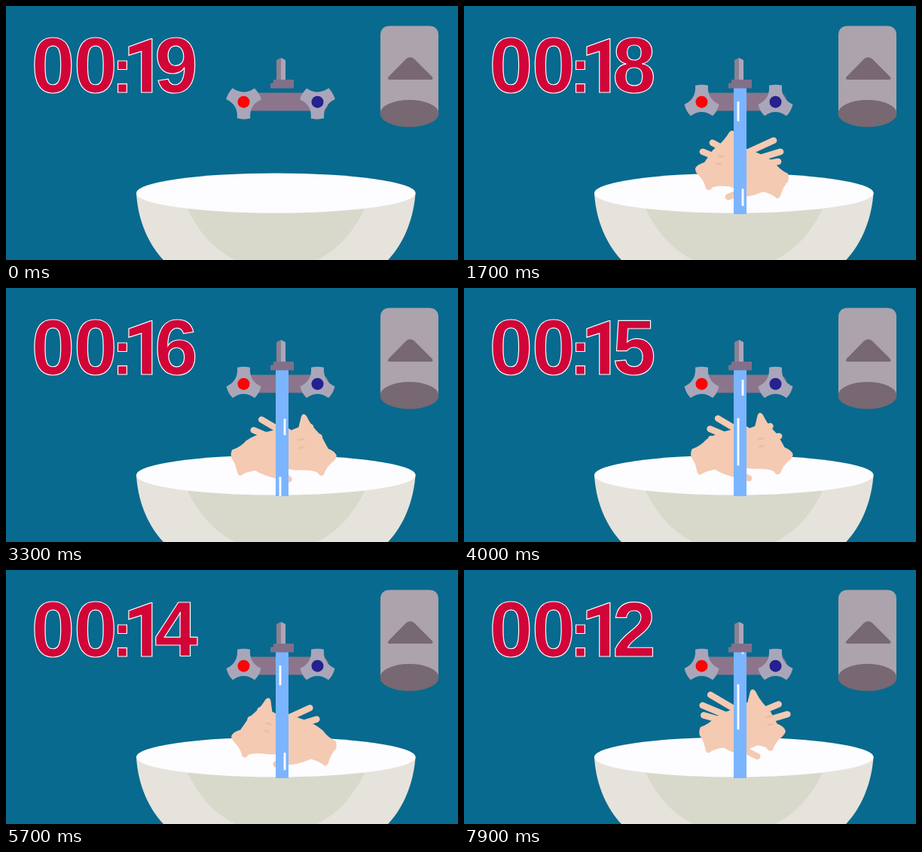
Write an HTML page that moves like this. It is 600 by 338 pixels and loops after 8 s.

```html
<!DOCTYPE html>
<html lang="en">
<head>
<meta charset="utf-8">
<title>Hand washing timer</title>
<style>
  html, body { margin: 0; width: 100%; height: 100%; overflow: hidden; background: #086a8e; }
  svg { display: block; width: 100vw; height: 100vh; }
  .clock {
    font: 700 103px "Liberation Sans", Arial, sans-serif;
    text-anchor: middle;
    fill: #d10538;
    stroke: #fff;
    stroke-width: 1.2;
  }
  .clock .one { font: 700 100px Roboto, sans-serif; }
  .clock .colon { font-size: 84px; }
  .skin { fill: #f4cab2; }
  .finger { fill: none; stroke: #f4cab2; stroke-width: 8.5; stroke-linecap: round; }
  .crease { fill: none; stroke: #e9bda6; stroke-width: 2.5; stroke-linecap: round; }
  .shine { stroke: #fff; stroke-width: 2.8; }
</style>
</head>
<body>
<svg viewBox="0 0 600 338">
  <defs>
    <path id="knob" fill="#aaa6ba" d="M-8.500-22Q0-24 8.500-22Q7-4 23 3.200Q20.500 13 14.500 18.500Q0 8-14.500 18.500Q-20.500 13-23 3.200Q-7-4-8.500-22Z"/>
  </defs>
  <rect width="600" height="338" fill="#086a8e"/>

  <g class="clock">
    <g id="lead">
      <text x="62.500" y="114.500">0</text>
      <text x="119" y="114.500">0</text>
      <text class="colon" x="154.500" y="115">:</text>
      <text class="one" x="183.500" y="114.500">1</text>
    </g>
    <text id="unit" x="226" y="114.500">9</text>
  </g>

  <g id="dispenser">
    <path fill="#aca3ac" d="M497 143V39Q497 26.500 510 26.500H561Q574 26.500 574 39V143Z"/>
    <ellipse cx="535.500" cy="143" rx="39" ry="18" fill="#776872"/>
    <path fill="#776872" d="M508 94L531 70.500Q536.500 66 542 70.500L565.500 94Q568 98 564 98H509.500Q505 98 508 94Z"/>
  </g>

  <g id="basin">
    <path fill="#e6e3dc" d="M173 249C175 285 189 317 209 338H507C527 317 541 285 543.500 249Z"/>
    <path fill="#d8d9cb" d="M240 268C255 300 276 324 304 338H413C441 324 462 300 477 268Z"/>
    <ellipse cx="358.300" cy="249" rx="185.500" ry="26.500" fill="#fdfcff"/>
  </g>

  <rect x="303" y="115.500" width="125" height="24" rx="10" fill="#8c758c"/>
  <g transform="translate(315.500 127.700)">
    <use id="hot" href="#knob"/>
    <circle r="8" fill="#f90505"/>
  </g>
  <g transform="translate(413.500 127.700)">
    <use id="cold" href="#knob"/>
    <circle r="8" fill="#25218f"/>
  </g>

  <g id="hands">
    <g id="back">
      <path class="finger" d="M374 196L411 179M384 205L420 194M388 212L417 207"/>
      <path class="skin" d="M307 216Q309 211 319 208L330 192L338 185Q346 178 352 168Q357 163 359 169L361 184L380 194L392 240L358 241Q340 238 330 241Q325 248 321 243Q319 233 312 226Q306 220 307 216Z"/>
    </g>
    <g id="front">
      <path class="finger" d="M352 194L330 182M346 206L317 194M364 249L351 254"/>
      <path class="skin" d="M430 223Q419 218 413 209Q400 198 380 192L362 185L338 197L330 213L345 235L364 246L366 255Q385 253 397 247Q411 251 415 256Q419 257 421 250Q424 240 430 234Q432 228 430 223Z"/>
      <path class="crease" d="M338 199l6 2M336 209l5 2"/>
    </g>
  </g>

  <rect id="water" x="358" y="108" width="17" height="169" fill="#7bb5ff"/>
  <line id="shineA" class="shine" x1="364" x2="364"/>
  <line id="shineB" class="shine" x1="370" x2="370"/>

  <path fill="#8c8091" d="M359 98V72L365 69V98Z"/>
  <path fill="#aaa6ba" d="M365 98V69L371 72V98Z"/>
  <path fill="#80708a" d="M351 109.500V104Q351 102 355 102V98H382V109.500Z"/>
</svg>
<script>
  const LOOP = 8000, TOP = 109, BOTTOM = 277;
  const el = id => document.getElementById(id);
  const clamp = (v, a = 0, b = 1) => Math.min(b, Math.max(a, v));
  const ease = x => x * x * (3 - 2 * x);
  const progress = (t, from, to) => ease(clamp((t - from) / (to - from)));

  // Piecewise linear track of [time, value] pairs
  function track(points, t) {
    for (let i = 1; i < points.length; i++) {
      const [t0, a] = points[i - 1], [t1, b] = points[i];
      if (t < t1) return a + (b - a) * clamp((t - t0) / (t1 - t0));
    }
    return points[points.length - 1][1];
  }

  const shines = [
    { id: 'shineA', wrap: 500,
      head: [[550, 109], [700, 153], [900, 212], [1000, 236], [1180, 277]],
      tail: [[610, 109], [700, 127], [900, 152], [1000, 173], [1400, 277]] },
    { id: 'shineB', wrap: 880,
      head: [[893, 109], [1000, 143], [1700, 266], [1770, 277]],
      tail: [[925, 109], [1000, 122], [1700, 243], [1860, 277]] }
  ];

  function drawClock(t) {
    const digit = 9 - Math.floor(t / 1000);
    el('unit').textContent = digit;
    // The narrow 7 shifts the centred line
    el('lead').setAttribute('transform', `translate(${digit === 7 ? 3 : 0})`);
  }

  function drawTap(t) {
    const turn = 60 - 60 * progress(t, 100, 700);
    el('hot').setAttribute('transform', `rotate(${-turn})`);
    el('cold').setAttribute('transform', `rotate(${turn})`);

    const end = clamp(TOP + (t - 500) * 0.375, TOP, BOTTOM);
    el('water').setAttribute('height', end > TOP ? end - 108 : 0);
    for (const s of shines) {
      const u = t % 1000, p = u < s.wrap ? u + 1000 : u;
      el(s.id).setAttribute('y1', Math.min(end, track(s.tail, p)));
      el(s.id).setAttribute('y2', Math.min(end, track(s.head, p)));
    }
  }

  // The hands rub back and forth and swap places every 2.1 s
  function drawHands(t) {
    const s = (t - 2400 + 4200) % 4200;
    const swapped = s < 2100;
    const phase = swapped ? -51 + 0.45 * s : -168 + 0.45 * (s - 2100);
    const gap = 1.3 + 6.5 * Math.cos(phase * Math.PI / 180);
    const rise = 190 * (1 - progress(t, 950, 1500));
    const mirror = 'translate(3 -5) rotate(6 368 210) translate(736.5 0) scale(-1 1)';
    el('hands').setAttribute('transform', `translate(0 ${rise}) ${swapped ? mirror : ''}`);
    el('front').setAttribute('transform', `translate(${gap} ${gap * 0.6})`);
    el('back').setAttribute('transform', `translate(${-gap} ${gap * 0.6})`);
  }

  const start = performance.now();
  function frame() {
    const t = (performance.now() - start) % LOOP;
    drawClock(t);
    drawTap(t);
    drawHands(t);
    requestAnimationFrame(frame);
  }
  frame();
</script>
</body>
</html>
```
